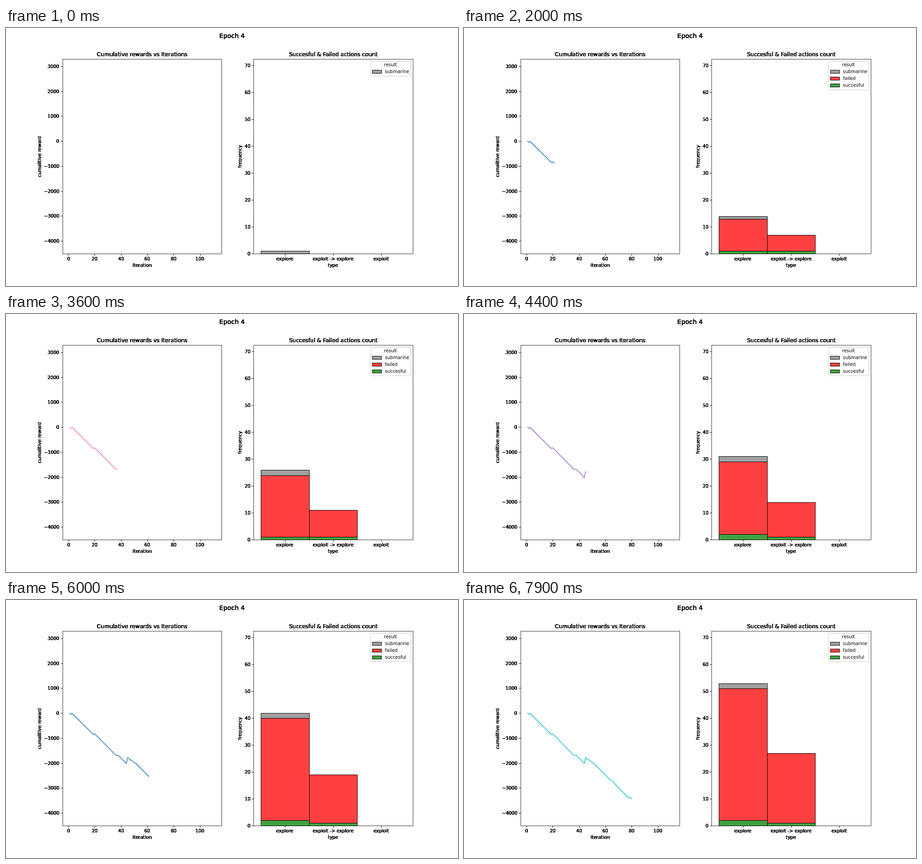
An HTML page with a canvas for the animation above (8000 ms loop, 990 px wide and 566 px high).

```html
<!DOCTYPE html>
<html lang="en">
<head>
<meta charset="utf-8">
<title>Epoch 4</title>
<style>
html, body { margin: 0; width: 990px; height: 566px; overflow: hidden; background: #fff; }
canvas { display: block; }
</style>
</head>
<body>
<canvas id="stage" width="990" height="566"></canvas>
<script>
const ctx = document.getElementById('stage').getContext('2d');

const STEP = 100, COUNT = 80;
const TOP = 68, BOTTOM = 495;
const CYCLE = ['#1f77b4', '#ff7f0e', '#2ca02c', '#d62728', '#9467bd',
               '#8c564b', '#e377c2', '#7f7f7f', '#bcbd22', '#17becf'];
const KINDS = [
  { name: 'submarine', color: '#a0a0a0' },
  { name: 'failed', color: '#ff4040' },
  { name: 'succesful', color: '#40a040' }
];

// Corners of the cumulative reward curve: [iteration, reward]
const REWARD = [[1, 0], [2, -50], [3, -25], [19, -862], [20, -832], [36, -1688], [38, -1698],
  [44, -2024], [45, -1780], [47, -1875], [48, -1890], [50, -1990], [51, -2002],
  [63, -2650], [64, -2662], [77, -3372], [79, -3382], [80, -3437]];

// Iterations that took the "exploit -> explore" branch; all others are "explore"
const SWITCHED = new Set([5, 7, 8, 10, 12, 16, 20, 25, 31, 33, 36, 39, 41, 43, 46, 50,
  57, 59, 61, 64, 66, 69, 71, 73, 75, 77, 80]);
const SUBMARINE = new Set([1, 37]);
const SUCCESS = new Set([3, 20, 45]);

const iterX = i => 136.72 + 2.8823 * i;
const rewardY = v => 248 - 0.05475 * v;
const freqY = v => Math.round(495.25 - 5.8985 * v);
const barX = k => Math.round(558.1 + 105.68 * k);

// Text starts on a whole pixel; repeated passes harden the glyph edges.
// align: 0 left, 0.5 centre, 1 right
function text(str, x, y, size, align = 0.5, passes = 7) {
  ctx.font = size + 'px "DejaVu Sans", sans-serif';
  ctx.fillStyle = '#000';
  const start = Math.round(x - ctx.measureText(str).width * align);
  for (let i = 0; i < passes; i++) ctx.fillText(str, start, y);
}

function sideText(str, x, y, size) {
  ctx.save();
  ctx.rotate(-Math.PI / 2);
  text(str, -y, x, size);
  ctx.restore();
}

function box(x0, y0, x1, y1, fill, width = 1) {
  if (fill) {
    ctx.fillStyle = fill;
    ctx.fillRect(x0 + 0.5, y0 + 0.5, x1 - x0, y1 - y0);
  }
  ctx.strokeStyle = '#000';
  ctx.lineWidth = width;
  ctx.lineJoin = 'miter';
  ctx.strokeRect(x0 + 0.5, y0 + 0.5, x1 - x0, y1 - y0);
}

function tickX(x, label) {
  ctx.fillStyle = '#000';
  ctx.fillRect(Math.round(x), BOTTOM + 1, 1, 3.5);
  text(label, x, 510, 10);
}

function tickY(left, y, label) {
  ctx.fillStyle = '#000';
  ctx.fillRect(Math.round(left) - 3.5, Math.round(y), 3.5, 1);
  text(label, left - 7, Math.round(y) + 4, 10, 1);
}

function drawAxes() {
  text('Epoch 4', 495, 22, 14);

  text('Cumulative rewards vs Iterations', 298.1, 62, 12);
  for (let i = 0; i <= 100; i += 20) tickX(iterX(i), String(i));
  for (let v = -4000; v <= 3000; v += 1000) {
    tickY(123.75, rewardY(v), String(v).replace('-', '\u2212'));
  }
  text('iteration', 298.1, 524, 10);
  sideText('cumalitive reward', 77, 281.6, 10);

  text('Succesful & Failed actions count', 716.6, 62, 12);
  ['explore', 'exploit -> explore', 'exploit'].forEach((s, k) => tickX(610.9 + 105.68 * k, s));
  for (let v = 0; v <= 70; v += 10) tickY(542.25, freqY(v), String(v));
  text('type', 716.6, 524, 10);
  sideText('frequency', 516, 281.6, 10);
}

function drawCurve(n) {
  if (n < 2) return;
  ctx.beginPath();
  ctx.moveTo(iterX(1), rewardY(0));
  for (let k = 1; k < REWARD.length; k++) {
    const [a, va] = REWARD[k - 1], [b, vb] = REWARD[k];
    const end = Math.min(b, n);
    ctx.lineTo(iterX(end), rewardY(va + (vb - va) * (end - a) / (b - a)));
    if (b >= n) break;
  }
  ctx.strokeStyle = CYCLE[(n - 1) % 10];
  ctx.lineWidth = 1.5;
  ctx.lineCap = 'square';
  ctx.lineJoin = 'round';
  ctx.stroke();
}

function drawBars(n) {
  const counts = [[0, 0, 0], [0, 0, 0]];
  for (let i = 1; i <= n; i++) {
    const kind = SUBMARINE.has(i) ? 0 : SUCCESS.has(i) ? 2 : 1;
    counts[SWITCHED.has(i) ? 1 : 0][kind]++;
  }
  counts.forEach((c, k) => {
    let base = 0;
    for (let kind = 2; kind >= 0; kind--) {
      if (!c[kind]) continue;
      box(barX(k), freqY(base + c[kind]), barX(k + 1), freqY(base), KINDS[kind].color);
      base += c[kind];
    }
  });
}

function drawLegend(n) {
  const rows = Math.min(n, 3);
  ctx.beginPath();
  ctx.roundRect(798.5, 73.5, 88, Math.round(90.6 + 14.7 * rows) - 73, 2);
  ctx.fillStyle = '#fff';
  ctx.fill();
  ctx.strokeStyle = '#ccc';
  ctx.lineWidth = 1;
  ctx.stroke();
  text('result', 842.3, 84, 10, 0.5, 1);
  for (let k = 0; k < rows; k++) {
    const y = Math.round(99.4 + 14.7 * k);
    box(802, y - 7, 822, y, KINDS[k].color);
    text(KINDS[k].name, 830.3, y, 10, 0, 1);
  }
}

function draw(n) {
  ctx.fillStyle = '#fff';
  ctx.fillRect(0, 0, 990, 566);
  drawAxes();
  drawCurve(n);
  drawBars(n);
  box(124, TOP, 472, BOTTOM, null, 0.8);
  box(542, TOP, 891, BOTTOM, null, 0.8);
  drawLegend(n);
}

let shown = 0;
function tick() {
  const n = Math.floor(performance.now() / STEP) % COUNT + 1;
  if (n !== shown) draw(shown = n);
  requestAnimationFrame(tick);
}
tick();
</script>
</body>
</html>
```
